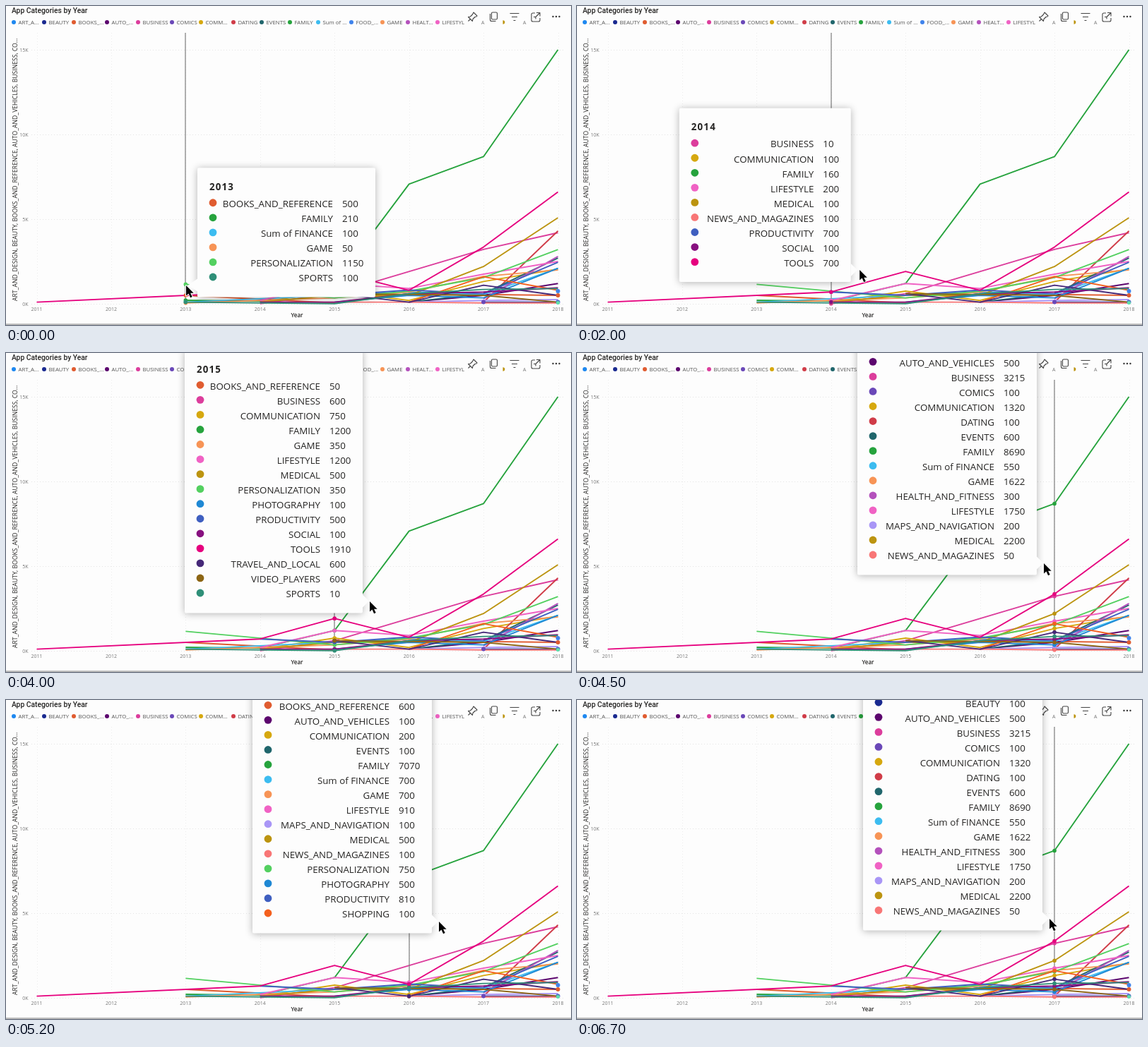
An HTML page with a canvas for the animation above (6800 ms loop, 800 by 452 pixels).

```html
<!DOCTYPE html>
<html lang="en">
<head>
<meta charset="utf-8">
<title>App Categories by Year</title>
<style>
html, body { margin: 0; width: 100%; height: 100%; overflow: hidden; background: #fdfdfd; }
canvas { display: block; }
</style>
</head>
<body>
<canvas id="stage" width="800" height="452"></canvas>
<script>
const ctx = document.getElementById('stage').getContext('2d');
const LOOP = 6800, STEP = 100, LAG = 30;
const SANS = '"Open Sans", "Noto Sans", sans-serif';
const INK = '#252423';

// name, colour, then year (two digits) and value pairs
const series = [
  ['BEAUTY', '#1a2a90', '17:100 18:100'],
  ['BOOKS_AND_REFERENCE', '#e05c30', '13:500 15:50 16:600 18:500'],
  ['AUTO_AND_VEHICLES', '#5c066e', '16:100 17:500 18:1200'],
  ['BUSINESS', '#dc3d9c', '14:10 15:600 17:3215 18:4200'],
  ['COMICS', '#6a48b8', '17:100'],
  ['COMMUNICATION', '#d6a80f', '14:100 15:750 16:200 17:1320 18:2050'],
  ['DATING', '#d03c48', '17:100 18:4300'],
  ['EVENTS', '#20666c', '16:100 17:600 18:2700'],
  ['FAMILY', '#26a33d', '13:210 14:160 15:1200 16:7070 17:8690 18:15000'],
  ['Sum of FINANCE', '#3cbcf0', '13:100 16:700 17:550 18:2100'],
  ['GAME', '#f79456', '13:50 15:350 16:700 17:1622 18:2000'],
  ['HEALTH_AND_FITNESS', '#b451bc', '17:300 18:2800'],
  ['LIFESTYLE', '#f062c4', '14:200 15:1200 16:910 17:1750 18:2500'],
  ['MAPS_AND_NAVIGATION', '#a996f6', '16:100 17:200 18:250'],
  ['MEDICAL', '#bc9410', '14:100 15:500 16:500 17:2200 18:5080'],
  ['NEWS_AND_MAGAZINES', '#f87676', '14:100 16:100 17:50 18:50'],
  ['PERSONALIZATION', '#53d060', '13:1150 15:350 16:750 17:1550 18:3200'],
  ['PHOTOGRAPHY', '#1f88d4', '15:100 16:500 17:350 18:2100'],
  ['PRODUCTIVITY', '#3f5fc0', '14:700 15:500 16:810 17:600 18:2450'],
  ['SHOPPING', '#f4601e', '16:100 17:1600 18:800'],
  ['SOCIAL', '#87107f', '14:100 15:100 16:600 17:700 18:950'],
  ['TOOLS', '#e6007e', '11:100 14:700 15:1910 16:800 17:3350 18:6600'],
  ['TRAVEL_AND_LOCAL', '#452878', '15:600 16:100 17:1100 18:500'],
  ['VIDEO_PLAYERS', '#8c6514', '15:600 17:500 18:100'],
  ['SPORTS', '#2f8f78', '13:100 15:10 16:600 17:850 18:900']
].map(([name, color, data]) => ({
  name, color, points: data.split(' ').map(p => p.split(':').map(Number))
}));

const legend = [
  ['ART_A...', 11, '#1e88f0'], ['BEAUTY', 54, '#1a2a90'], ['BOOKS_...', 96, '#e05c30'],
  ['AUTO_...', 143, '#5c066e'], ['BUSINESS', 187, '#dc3d9c'], ['COMICS', 235, '#6a48b8'],
  ['COMM...', 276, '#d6a80f'], ['DATING', 322, '#d03c48'], ['EVENTS', 362, '#20666c'],
  ['FAMILY', 402, '#26a33d'], ['Sum of ...', 442, '#3cbcf0'], ['FOOD_...', 489, '#3f83ec'],
  ['GAME', 533, '#f79456'], ['HEALT...', 569, '#b451bc'], ['LIFESTYLE', 611, '#f062c4']
];

// pointer path: time, x, y
const path = [
  [0, 255, 396], [700, 283, 394], [1100, 331, 390], [1400, 353, 386], [2100, 408, 372],
  [2600, 503, 353], [2900, 517, 350], [3600, 515, 352], [4000, 515, 352], [4400, 661, 298],
  [4800, 661, 298], [5100, 613, 314], [5700, 613, 314], [6200, 669, 310], [LOOP, 669, 310]
];

const tipWidth = { 13: 252, 14: 243, 15: 252, 16: 254, 17: 254 };
const xOf = year => 43.5 + (year - 11) * 105.43;
const yOf = value => 422 - value * 0.024;

function pointer(t) {
  t = Math.max(0, t);
  const i = path.findIndex(p => p[0] > t);
  const [t0, x0, y0] = path[i - 1], [t1, x1, y1] = path[i];
  const k = (t - t0) / (t1 - t0);
  return [x0 + (x1 - x0) * k, y0 + (y1 - y0) * k];
}

function text(str, x, y, size, { color = INK, align = 'left', weight = 400, family = SANS, spacing = 0 } = {}) {
  ctx.font = `${weight} ${size}px ${family}`;
  ctx.fillStyle = color;
  ctx.textAlign = align;
  ctx.textBaseline = 'alphabetic';
  ctx.letterSpacing = spacing + 'px';
  ctx.fillText(str, x, y + size * 0.36);
}

function dot(x, y, r, color) {
  ctx.fillStyle = color;
  ctx.beginPath();
  ctx.arc(x, y, r, 0, 7);
  ctx.fill();
}

function line(points, color, width) {
  ctx.strokeStyle = color;
  ctx.lineWidth = width;
  ctx.lineJoin = 'round';
  ctx.beginPath();
  points.forEach(p => ctx.lineTo(...p));
  ctx.stroke();
}

function drawAxes() {
  ctx.setLineDash([1, 3]);
  for (let year = 11; year <= 18; year++) {
    const x = Math.round(xOf(year)) + 0.5;
    line([[x, 38], [x, 422]], '#ececec', 1);
  }
  for (let k = 0; k <= 15; k += 5) {
    const y = yOf(k * 1000) + 0.5;
    line([[36, y], [790, y]], '#e4e4e4', 1);
  }
  ctx.setLineDash([]);
  const grey = { color: '#777', align: 'center' };
  for (let year = 11; year <= 18; year++) text('20' + year, xOf(year), 429.5, 7, grey);
  for (let k = 0; k <= 15; k += 5) text(k + 'K', 31.5, yOf(k * 1000), 7, { color: '#777', align: 'right' });
  text('Year', 412, 438.5, 8, { align: 'center', weight: 600 });
  ctx.save();
  ctx.translate(12.5, 418);
  ctx.rotate(-Math.PI / 2);
  text('ART_AND_DESIGN, BEAUTY, BOOKS_AND_REFERENCE, AUTO_AND_VEHICLES, BUSINESS, CO...', 0, 0, 8.65);
  ctx.restore();
  line([[0, 451], [800, 451]], '#a4a4a4', 1.4);
}

function drawHeader() {
  text('App Categories by Year', 8, 6.5, 10.3, { weight: 500, family: 'Roboto, sans-serif' });
  ctx.save();
  ctx.beginPath();
  ctx.rect(0, 15, 649, 16);
  ctx.clip();
  for (const [name, x, color] of legend) {
    dot(x, 23, 3, color);
    text(name, x + 6.5, 23, 7.8, { color: '#555' });
  }
  ctx.restore();
  text('A', 673, 23, 7, { color: '#777' });
  text('A', 732, 23, 7, { color: '#777' });
  ctx.fillStyle = '#bc9410';
  ctx.beginPath();
  ctx.arc(703.5, 23, 2.8, -Math.PI / 2, Math.PI / 2);
  ctx.fill();
}

const icons = new Path2D(
  'M662 9l5 5-1 1-2 .5-3 3-.5 3-6-6 3-.5 3-3zM657.5 18.5l-3 3' +
  'M689 9h5q1.5 0 1.5 1.5v7q0 1.5-1.5 1.5h-5q-1.5 0-1.5-1.5v-7q0-1.5 1.5-1.5z' +
  'M685.5 11v8.5q0 2 2 2h6' +
  'M713.5 10.5h13M716 15.5h8M718.5 20.5h3' +
  'M749 10h-3q-2 0-2 2v8q0 2 2 2h8q2 0 2-2v-3M751 9.5h5v5M756 9.5l-6 6h-3m3 0v3'
);

function drawIcons() {
  ctx.strokeStyle = '#444';
  ctx.lineWidth = 1.1;
  ctx.stroke(icons);
  for (const x of [774.5, 779, 783.5]) dot(x, 15, 1.2, '#333');
}

function drawSeries(year) {
  for (const { color, points } of series) line(points.map(([y, v]) => [xOf(y), yOf(v)]), color, 1.9);
  const x = Math.round(xOf(year));
  line([[x, 38], [x, 422]], '#7c7c7c', 1.2);
  dot(xOf(17), yOf(100), 3, '#6a48b8');
  dot(xOf(18), yOf(750), 3, '#3f83ec');
  dot(xOf(18), yOf(500), 3, '#e05c30');
  dot(xOf(18), yOf(100), 3, '#4668c5');
  dot(xOf(18), yOf(60), 2.5, '#5fe0a8');
  for (const { color, points } of series) {
    const hit = points.find(p => p[0] === year);
    if (hit) dot(xOf(year), yOf(hit[1]), 2.8, color);
  }
}

function drawTooltip(year, [px, py]) {
  const rows = series
    .map(s => ({ ...s, hit: s.points.find(p => p[0] === year) }))
    .filter(s => s.hit).slice(0, 15);
  const width = tipWidth[year];
  const onLeft = px - 10 - width >= 0;
  const left = onLeft ? px - 10 - width : px + 16;
  const right = left + width, bottom = py + 16.5;
  const first = bottom - 27 - 21.05 * (rows.length - 1);
  const top = first - 51;
  const edge = onLeft ? right : left, tip = onLeft ? 9 : -13;

  ctx.save();
  ctx.shadowColor = 'rgba(0,0,0,.3)';
  ctx.shadowBlur = 11;
  ctx.shadowOffsetY = 1;
  ctx.fillStyle = '#fdfdfd';
  ctx.beginPath();
  ctx.roundRect(left, top, width, bottom - top, 2);
  ctx.fill();
  ctx.restore();
  ctx.fillStyle = '#fdfdfd';
  ctx.beginPath();
  ctx.moveTo(edge, bottom - 26);
  ctx.lineTo(edge + tip, bottom - 17);
  ctx.lineTo(edge, bottom - 8);
  ctx.fill();

  const valueX = right - 17 - (year === 14 ? 22.5 : 30);
  text('20' + year, left + 17, first - 24, 13.3, { weight: 700, spacing: 1.2 });
  rows.forEach(({ name, color, hit }, i) => {
    const y = first + i * 21.05;
    dot(left + 22, y - 1.5, 5.4, color);
    text(name, valueX - 13, y, 13.3, { align: 'right' });
    text(hit[1], valueX, y, 13.3);
  });
}

const arrow = new Path2D('M0 0v14.5l3.5-3 2.6 5.7 2.6-1.2-2.6-5.3h4.6z');

function drawPointer(x, y) {
  ctx.save();
  ctx.translate(x, y);
  ctx.strokeStyle = '#fff';
  ctx.lineWidth = 2;
  ctx.stroke(arrow);
  ctx.fillStyle = '#000';
  ctx.fill(arrow);
  ctx.restore();
}

function frame(now) {
  const t = Math.floor((now % LOOP) / STEP) * STEP;
  const [x, y] = pointer(t);
  const year = 11 + Math.round((x - xOf(11)) / 105.43);
  ctx.fillStyle = '#fdfdfd';
  ctx.fillRect(0, 0, 800, 452);
  drawAxes();
  drawHeader();
  drawIcons();
  drawSeries(year);
  drawTooltip(year, pointer(t - LAG));
  drawPointer(x, y);
  requestAnimationFrame(frame);
}
requestAnimationFrame(frame);
</script>
</body>
</html>
```
